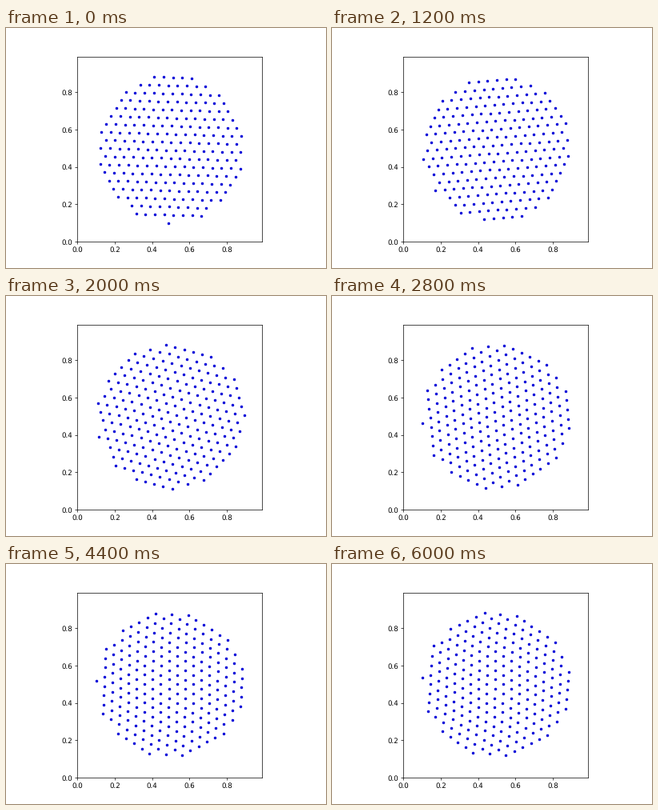
Recreate the animation shown at these times as a matplotlib script. Size 400 by 300 pixels, loop 6100 ms.

```python
import numpy as np
import matplotlib.pyplot as plt
from matplotlib.animation import FuncAnimation

FRAMES, STEP_MS = 61, 100
CENTER, RADIUS, GAP = 0.5, 0.4, 0.05
START = 1.8  # degrees turned at time zero

plt.rcParams["font.family"] = "DejaVu Sans"
plt.rcParams["text.hinting"] = "none"


def hex_disc():
    """Triangular lattice, cut to a disc around the origin."""
    pts = []
    for row in range(20):
        y = -RADIUS + row * GAP * np.sqrt(3) / 2
        shift = GAP / 2 if row % 2 else 0
        for col in range(-9, 9):
            x = col * GAP + shift
            if np.hypot(x, y) <= RADIUS + 1e-9:
                pts.append((x, y))
    return np.array(pts).T


X, Y = hex_disc()
R2 = (X**2 + Y**2) / RADIUS**2


def spin(t, end, rate, power):
    """Angle in degrees of a turn that slows down towards end."""
    return end - (end - START) * np.exp(-rate * t**power)


def positions(i):
    """The disc turns clockwise; its core comes to rest before its rim."""
    t = i * STEP_MS / 1000
    core = spin(t, 90.4, 0.74, 1.35)
    rim = spin(t, 95.8, 0.695, 1.08)
    a = np.radians(core + (rim - core) * R2)
    c, s = np.cos(a), np.sin(a)
    return np.column_stack([CENTER + X * c + Y * s, CENTER - X * s + Y * c])


fig = plt.figure(figsize=(6.4, 4.8), dpi=62.5, facecolor="white")
# A hair left of the default place, so the frame snaps to the right pixels.
ax = fig.add_axes([0.1245, 0.11, 0.775, 0.77], aspect="equal")
ax.set(xlim=(0, 0.99), ylim=(0, 0.99))
ticks = [0, 0.2, 0.4, 0.6, 0.8]
ax.set_xticks(ticks)
ax.set_yticks(ticks)
dots = ax.scatter(*positions(0).T, s=9, color="#0000d8", linewidths=1)


def draw(i):
    dots.set_offsets(positions(i))
    return dots,


anim = FuncAnimation(fig, draw, frames=FRAMES, interval=STEP_MS,
                     repeat=True, repeat_delay=0, blit=False)
plt.show()
```
